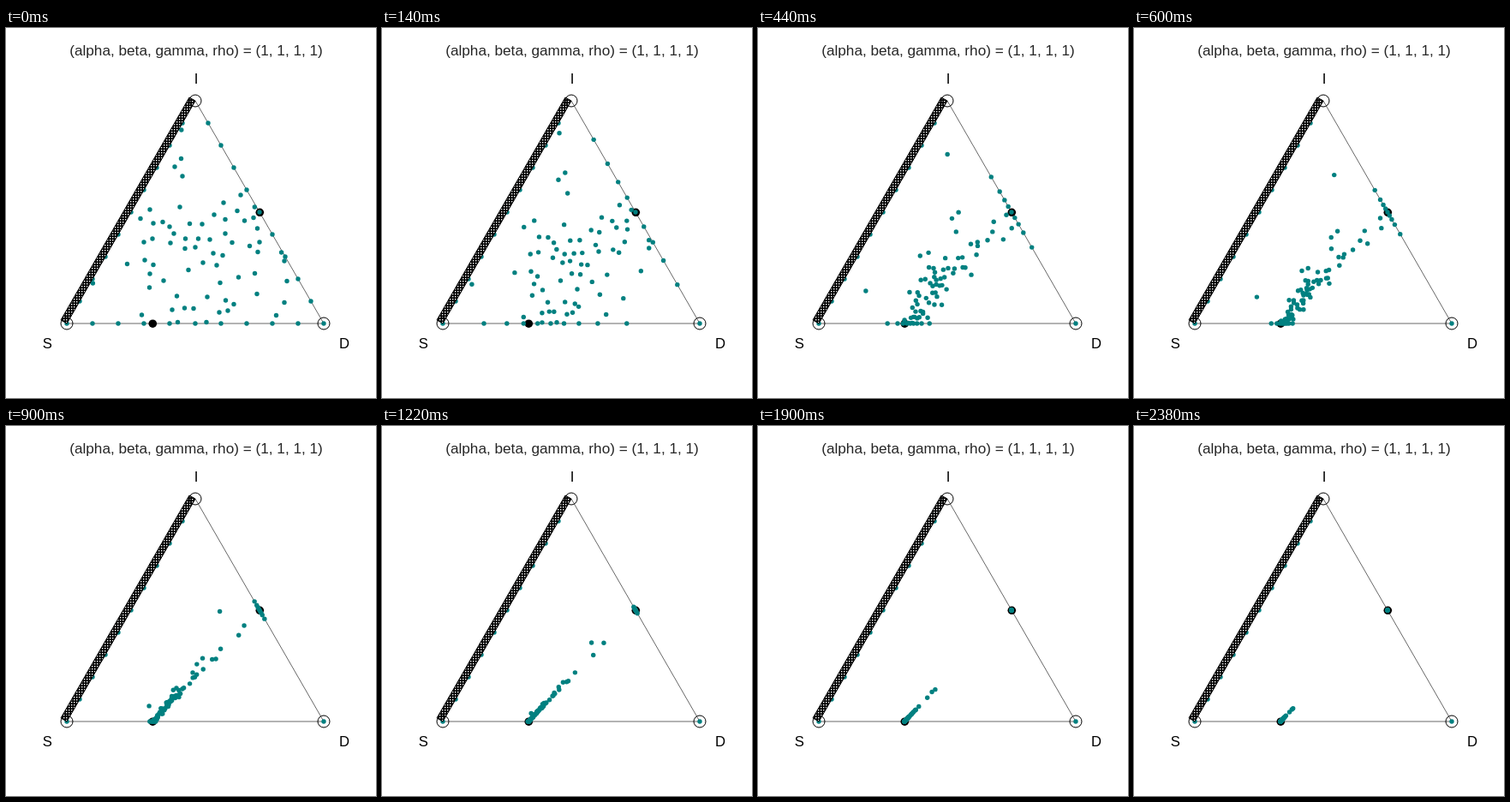
Animation of 432 by 432 pixels, one loop 2400 ms. Source, as an HTML page with a canvas:

```html
<!DOCTYPE html>
<html lang="en">
<head>
<meta charset="utf-8">
<title>Replicator dynamics on a simplex</title>
<style>
  html, body { margin: 0; overflow: hidden; background: #fff; }
  canvas { display: block; }
</style>
</head>
<body>
<canvas id="stage" width="432" height="432"></canvas>
<script>
const ctx = document.getElementById('stage').getContext('2d');
const FRAMES = 120, FRAME_MS = 20, STEP = 15 / (FRAMES - 1);
const S = [71, 345], I = [221, 85], D = [371, 345];

// Interior starting positions on the stage: x, y pairs.
const starts = [
  204.8,119, 204.5,152.5, 197,162, 206,173, 203,209, 168,212, 157,222.5, 172,228,
  183,226.5, 191,232, 196,240, 192,251, 171,246, 161,250, 162,271, 172,276.5,
  141.5,275.5, 168,287, 167.5,303, 184,295, 101.4,298, 158.5,335, 254,204, 274,195,
  270,213.5, 243,218, 256,223.5, 278.5,225, 289,221.5, 293.5,234, 229,229, 214.5,228.5,
  209.5,246, 224.5,246, 238,247, 209,257.5, 221,256, 256,240, 264,250.5, 242,263,
  253,265.5, 230,274, 246,277, 213,282.5, 250,297.5, 271.5,291, 290.5,286.5, 293,310.5,
  284.5,254.5, 296,250, 294,261.5, 321.6,262, 325,272, 328,295.5, 325,320.5, 315.5,335.5,
  266,322.5, 259,330, 249,332, 256.5,318, 235,314, 219,327.5, 208.5,327, 194,329,
  199.5,313, 200.5,343.5, 234,343.5, 290.3,209
];

// A state is [i, d]; the share of S is 1 - i - d.
const toStage = ([i, d]) => [71 + 150 * i + 300 * d, 345 - 260 * i];
const toState = (x, y) => {
  const i = (345 - y) / 260;
  return [i, (x - 71 - 150 * i) / 300];
};

// Payoffs: S earns 2d, I earns d, D earns 1 - d.
function flow([i, d]) {
  const s = 1 - i - d;
  const mean = d * (2 * s + i + 1 - d);
  return [i * (d - mean), d * (1 - d - mean)];
}

function advance(p) {
  const move = (v, h) => [p[0] + v[0] * h, p[1] + v[1] * h];
  const a = flow(p);
  const b = flow(move(a, STEP / 2));
  const c = flow(move(b, STEP / 2));
  const e = flow(move(c, STEP));
  return p.map((v, n) => v + STEP / 6 * (a[n] + 2 * b[n] + 2 * c[n] + e[n]));
}

let states = [[0, 0], [0, 1]];
for (let k = 1; k < 10; k++) {
  const f = k / 10;
  states.push([f, 0], [0, f], [1 - f, f]);
}
for (let n = 0; n < starts.length; n += 2) states.push(toState(starts[n], starts[n + 1]));

const frames = [];
for (let n = 0; n < FRAMES; n++) {
  frames.push(states.map(toStage));
  states = states.map(advance);
}

function circle([x, y], r) {
  ctx.beginPath();
  ctx.arc(x, y, r, 0, 2 * Math.PI);
}

function disc(p, r, color) {
  circle(p, r);
  ctx.fillStyle = color;
  ctx.fill();
}

function polygon(...points) {
  ctx.beginPath();
  points.forEach(p => ctx.lineTo(...p));
  ctx.closePath();
}

function label(text, x, y, size, color) {
  ctx.font = size + 'px Arial, "Liberation Sans", sans-serif';
  ctx.textAlign = 'center';
  ctx.fillStyle = color;
  ctx.fillText(text, x, y);
}

// Mesh that fills the bar along the neutral edge.
const tile = document.createElement('canvas');
tile.width = tile.height = 3;
const tileCtx = tile.getContext('2d');
tileCtx.fillRect(0, 0, 3, 3);
tileCtx.fillStyle = '#fff';
tileCtx.fillRect(1, 1, 1.4, 1.4);
const mesh = ctx.createPattern(tile, 'repeat');

function draw(dots) {
  ctx.fillStyle = '#fff';
  ctx.fillRect(0, 0, 432, 432);

  ctx.strokeStyle = '#000';
  ctx.lineWidth = 0.6;
  polygon(S, I, D);
  ctx.stroke();

  disc([171.3, 345.2], 4.8, '#000');
  disc([296.3, 215.3], 4.8, '#000');
  dots.forEach(p => disc(p, 2.7, '#008080'));

  polygon(S, I, [214, 81], [64, 341]);
  ctx.fillStyle = mesh;
  ctx.fill();
  ctx.lineWidth = 1;
  ctx.stroke();

  for (const corner of [S, I, D]) {
    circle(corner, 7);
    ctx.stroke();
  }

  label('(alpha, beta, gamma, rho) = (1, 1, 1, 1)', 222, 32, 17.2, '#262626');
  label('I', 222, 65, 16.7, '#000');
  label('S', 48.3, 374, 16.7, '#000');
  label('D', 395, 374, 16.7, '#000');
}

const begin = performance.now();
function tick() {
  const elapsed = performance.now() - begin;
  draw(frames[Math.floor(elapsed / FRAME_MS) % FRAMES]);
  requestAnimationFrame(tick);
}
tick();
</script>
</body>
</html>
```
